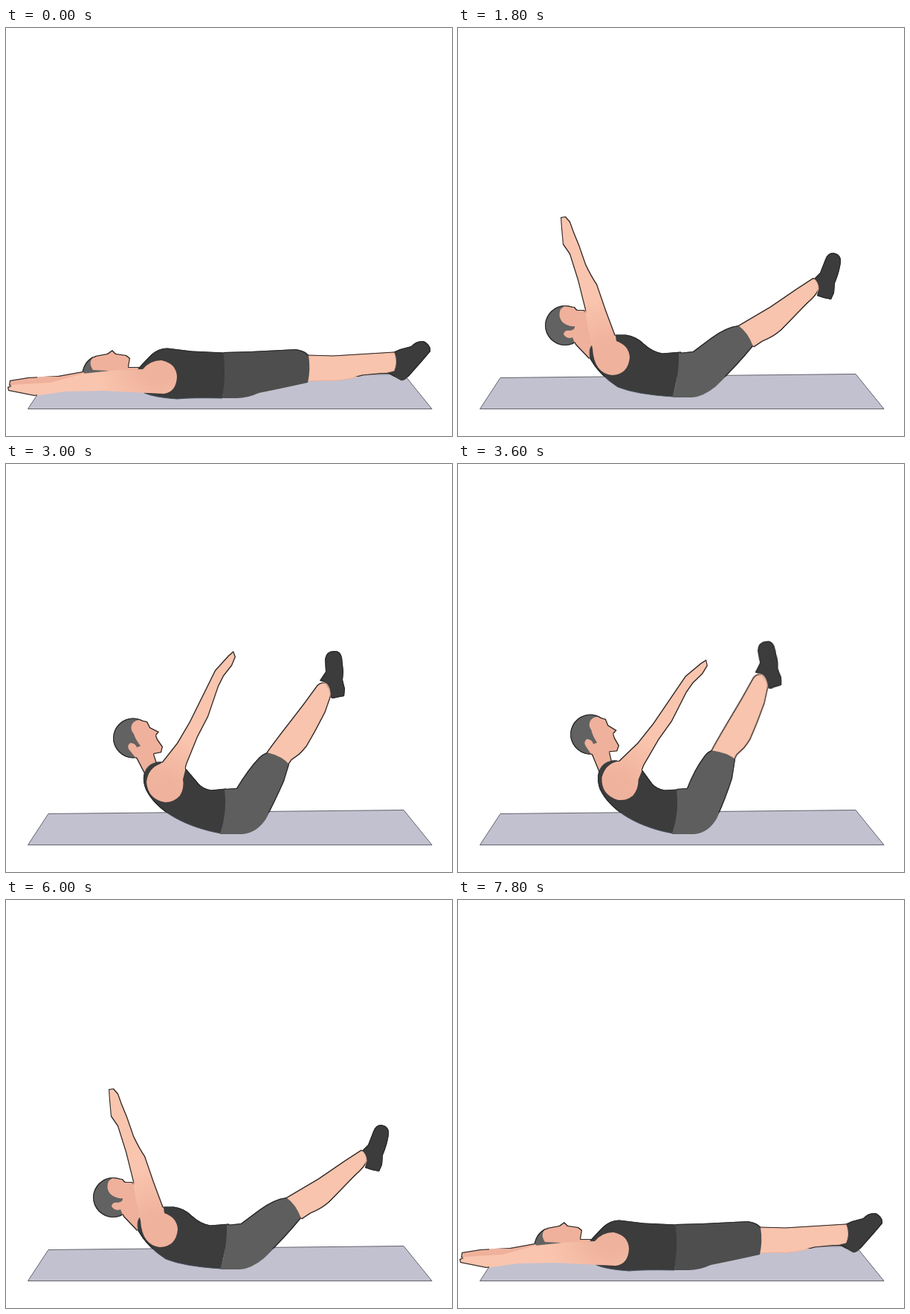
Animation, 600 px wide and 550 px high, one loop 8.4 s. Source, as an HTML page without scripts:

```html
<!DOCTYPE html>
<html lang="en">
<head>
<meta charset="utf-8">
<title>V-up exercise</title>
<style>
  html, body { margin: 0; width: 100%; height: 100%; overflow: hidden; background: #fff; }
  svg { display: block; width: 600px; height: 550px; }

  .arm { fill: url(#armSkin); }
  .face { fill: #efb19b; }
  .calf { fill: #f9c4ad; stroke: #eeb19c; }
  .hair { fill: #626262; }
  .shirt { fill: #3c3c3c; stroke: #43515b; }
  .shorts { fill: #5e5e5e; }
  .shoe { fill: #3c3c3c; }

  /* Poses run forwards, hold at the top, then run backwards: 14 slots of 600 ms. */
  .pose { opacity: 0; filter: url(#outline); animation: 8.4s step-end infinite; }
  #flat    { animation-name: flat; }
  #lift    { animation-name: lift; }
  #low     { animation-name: low; }
  #mid     { animation-name: mid; }
  #upright { animation-name: upright; }
  #high    { animation-name: high; }
  #peak    { animation-name: peak; }
  @keyframes flat    { 0%, 92.857% { opacity: 1 } 7.142%, 100% { opacity: 0 } }
  @keyframes lift    { 0%, 14.285%, 92.857%, 100% { opacity: 0 } 7.142%, 85.714% { opacity: 1 } }
  @keyframes low     { 0%, 21.428%, 85.714%, 100% { opacity: 0 } 14.285%, 78.571% { opacity: 1 } }
  @keyframes mid     { 0%, 28.571%, 78.571%, 100% { opacity: 0 } 21.428%, 71.428% { opacity: 1 } }
  @keyframes upright { 0%, 35.714%, 71.428%, 100% { opacity: 0 } 28.571%, 64.285% { opacity: 1 } }
  @keyframes high    { 0%, 42.857%, 64.285%, 100% { opacity: 0 } 35.714%, 57.142% { opacity: 1 } }
  @keyframes peak    { 0%, 57.142%, 100% { opacity: 0 } 42.857% { opacity: 1 } }
</style>
</head>
<body>
<svg viewBox="0 0 600 550">
  <defs>
    <radialGradient id="armSkin" gradientUnits="userSpaceOnUse" cx="207" cy="448" r="90">
      <stop offset=".25" stop-color="#efb29c"/>
      <stop offset="1" stop-color="#fac5ae"/>
    </radialGradient>
    <!-- Thin rim around the figure, only where it stands against white. -->
    <filter id="outline" filterUnits="userSpaceOnUse" x="0" y="0" width="600" height="550" color-interpolation-filters="sRGB">
      <feMorphology in="SourceAlpha" operator="erode" radius="1" result="inner"/>
      <feComposite in="SourceAlpha" in2="inner" operator="out" result="rim"/>
      <feFlood flood-color="#2a2a2a" x="0" y="0" width="600" height="470" result="aboveMat"/>
      <feFlood flood-color="#2a2a2a" x="0" y="470" width="42" height="80" result="besideMat"/>
      <feMerge><feMergeNode in="aboveMat"/><feMergeNode in="besideMat"/></feMerge>
      <feComposite in2="rim" operator="in" result="line"/>
      <feMerge><feMergeNode in="SourceGraphic"/><feMergeNode in="line"/></feMerge>
    </filter>

    <g id="lowHead">
      <circle class="hair" cx="131" cy="430" r="26"/>
      <path class="face" d="M122 407Q118 418 126 424L145 431Q146 435 138 434Q131 436 133 442Q139 446 146 444L155 452L176 460L190 430L140 405Z"/>
    </g>
    <path id="lowArm" class="arm" d="M43 331L53 328L65 337L78 348Q98 364 130 379Q158 396 195 432Q205 432 213 435Q228 443 228 457Q226 476 208 479Q193 479 184 469L172 457L145 430Q120 403 90 381L68 365L55 350L42 337L48 334Z"/>
    <g id="lowLeg">
      <path class="shoe" d="M525 362Q528 353 537 353Q547 355 546 365Q542 378 530 392L525 405Q522 414 515 413L503 405Q510 395 502 379L514 373Z"/>
      <path class="calf" d="M386 417Q410 413 430 405L475 389L501 380Q510 387 508 400Q500 408 480 416L450 435Q435 445 405 446L398 428Z"/>
    </g>

    <g id="midHead">
      <circle class="hair" cx="144" cy="401" r="27"/>
      <path class="face" d="M138 379Q134 388 140 396Q148 403 157 402Q158 407 150 408Q143 407 142 413Q147 420 154 417L158 427L176 446L192 430L180 395L170 380L160 380L157 376L143 375Z"/>
    </g>
    <path id="midArm" class="arm" d="M138 255L145 254L151 261L156 275L163 292L172 318Q180 335 187 345L199 380L212 415L213 422Q230 428 231 444Q229 467 207 468Q183 465 181 432L175 405L171 380L161 340L150 305L141 292L139 270Z"/>
    <g id="midLeg">
      <path class="shoe" d="M494 312Q497 303 505 303Q516 305 515 316Q513 330 507 344L506 357L502 366L492 364L483 361Q488 350 479 338L487 330Z"/>
      <path class="calf" d="M376 402L420 376L455 352L478 337Q485 343 485 352Q483 360 470 371L435 407Q425 416 410 422L398 430L385 415Z"/>
    </g>

    <g id="highHead">
      <circle class="hair" cx="171" cy="369.500" r="27"/>
      <path class="face" d="M180 345L190 347L194 355L206 361L202 366L204 371L211 381L209 389L199 391L203 403L210 410L190 425L176 398L168 388Q161 381 167 376Q174 376 176 382L181 380Q174 371 172 364Q166 357 170 350Q174 345 180 345Z"/>
    </g>
    <path id="highArm" class="arm" d="M208 404L230 376L247 347L281 278L299 258L306 252L309 260L304 272L293 286L286 300L272 341L258 368L243 405L238 425Q240 437 234 447Q226 456 214 456Q191 452 189 429Q191 410 208 404Z"/>
    <g id="highLeg">
      <path class="shoe" d="M429 263Q431 252 441 252Q450 251 452 261L454 280L453 291L456 303L455 313L444 315Q437 318 436 312Q437 298 428 294L422 292L430 280Z"/>
      <path class="calf" d="M350 390Q362 373 380 350L400 324L419 298Q425 293 431 296Q437 302 436 315L429 335Q416 361 404 381Q397 391 384 399L380 405L368 396Z"/>
    </g>
  </defs>

  <path d="M57 471.500L535 466.500L573 513.500H29.500Z" fill="#c2c1cf" stroke="#62626e"/>

  <g id="flat" class="pose">
    <path class="hair" d="M102 467Q104 450 117 443L142 464L134 489L118 488Z"/>
    <path class="face" d="M117 461Q109 449 120 442L136 439L143 434L148 439L162 441L167 445L165 457L182 457L195 470L140 470L138 462Z"/>
    <path class="shirt" d="M178 459L195 441Q205 432 217 432L250 436L293 438L296 470L291 499Q250 498 230 500Q200 498 186 492Z"/>
    <path class="face" d="M5 475L30 471L70 469L103 463L110 470L60 484L4 482Z"/>
    <path class="arm" d="M9 481L60 478L103 466L150 461L184 460Q194 448 209 448Q229 452 230 470Q229 491 212 493Q150 490 130 489L80 490L38 496L3 489L2 484Z"/>
    <path class="shoe" d="M490 466L515 463Q528 455 521 437L530 433L545 429Q552 421 562 422Q572 427 571 436L560 449L545 466Q536 477 531 475L515 466Z"/>
    <path class="calf" d="M405 441L440 442L522 437Q527 450 522 462L510 465L480 468Q450 477 430 475L406 476Z"/>
    <path class="shorts" style="fill:#4e4e4e" d="M293 437L330 436L390 433Q403 435 407 441Q410 460 406 478Q370 486 340 492Q325 499 310 499L291 499Q296 470 293 437Z"/>
  </g>

  <g id="lift" class="pose">
    <use href="#lowHead" transform="translate(-7 14) rotate(-20 131 430)"/>
    <path class="shirt" d="M185 443Q205 428 225 428Q260 437 293 438L297 468L289 499Q240 499 215 495Q185 487 172 462Z"/>
    <use href="#lowArm" transform="translate(-4 9) rotate(-22 205 456)"/>
    <use href="#lowLeg" transform="rotate(13 320 468)"/>
    <path class="shorts" d="M293 439L320 437L396 433Q405 447 406 469Q370 480 345 488Q325 499 310 500L289 499Q296 468 293 439Z"/>
  </g>

  <g id="low" class="pose">
    <use href="#lowHead"/>
    <path class="shirt" d="M192 427Q212 419 230 424L255 433Q272 440 293 438L297 465L289 498Q240 496 210 489Q186 478 171 457L180 450Z"/>
    <use href="#lowArm"/>
    <use href="#lowLeg"/>
    <path class="shorts" d="M293 439L316 438Q345 424 386 416Q398 427 404 450Q375 470 350 485Q330 498 310 500L288 498Q296 468 293 439Z"/>
  </g>

  <g id="mid" class="pose">
    <use href="#midHead"/>
    <path class="shirt" d="M212 414L226 414Q240 416 250 426Q262 437 275 439L300 437L296 465L289 497Q240 494 215 484Q190 468 178 446Q175 432 181 427Z"/>
    <use href="#midArm"/>
    <use href="#midLeg"/>
    <path class="shorts" d="M297 438L316 436L340 418Q360 403 377 401Q390 410 397 429Q375 456 347 483Q330 497 315 498L289 498Q298 465 297 438Z"/>
  </g>

  <g id="upright" class="pose">
    <use href="#midHead" transform="translate(7 -10) rotate(12 144 401)"/>
    <path class="shirt" d="M212 411L230 413Q243 417 252 427Q263 437 276 440L299 438L296 465L289 498Q242 494 217 482Q192 465 181 442Q178 426 190 418Z"/>
    <use href="#midArm" transform="translate(3 -5) rotate(20 207 444)"/>
    <use href="#midLeg" transform="rotate(-6 320 468)"/>
    <path class="shorts" d="M297 439L314 436L336 415Q354 398 369 396Q384 405 392 421Q372 453 347 481Q333 497 316 499L289 498Q298 465 297 439Z"/>
  </g>

  <g id="high" class="pose">
    <use href="#highHead"/>
    <path class="shirt" d="M209 402C188 401 180 420 189 440C204 470 245 490 289 498Q298 470 296 438L276 440Q264 438 258 430L241 410Z"/>
    <use href="#highArm"/>
    <use href="#highLeg"/>
    <path class="shorts" d="M294 438L310 437Q325 412 340 396Q346 390 352 389Q372 394 381 405L374 428Q362 455 350 478Q338 497 318 499L288 499Q298 470 294 438Z"/>
  </g>

  <g id="peak" class="pose">
    <use href="#highHead" transform="translate(7 -5) rotate(5 171 370)"/>
    <path class="shirt" d="M213 400C192 399 184 417 191 438C205 469 245 490 289 498Q298 470 296 439L278 440Q267 438 261 431L245 409Z"/>
    <use href="#highArm" transform="translate(4 -3) rotate(8 214 431)"/>
    <use href="#highLeg" transform="rotate(-7 322 468)"/>
    <path class="shorts" d="M294 438L308 437Q318 411 331 394Q336 387 341 386Q362 389 373 398L369 424Q359 455 348 478Q337 497 318 499L288 499Q298 470 294 438Z"/>
  </g>
</svg>
</body>
</html>
```
